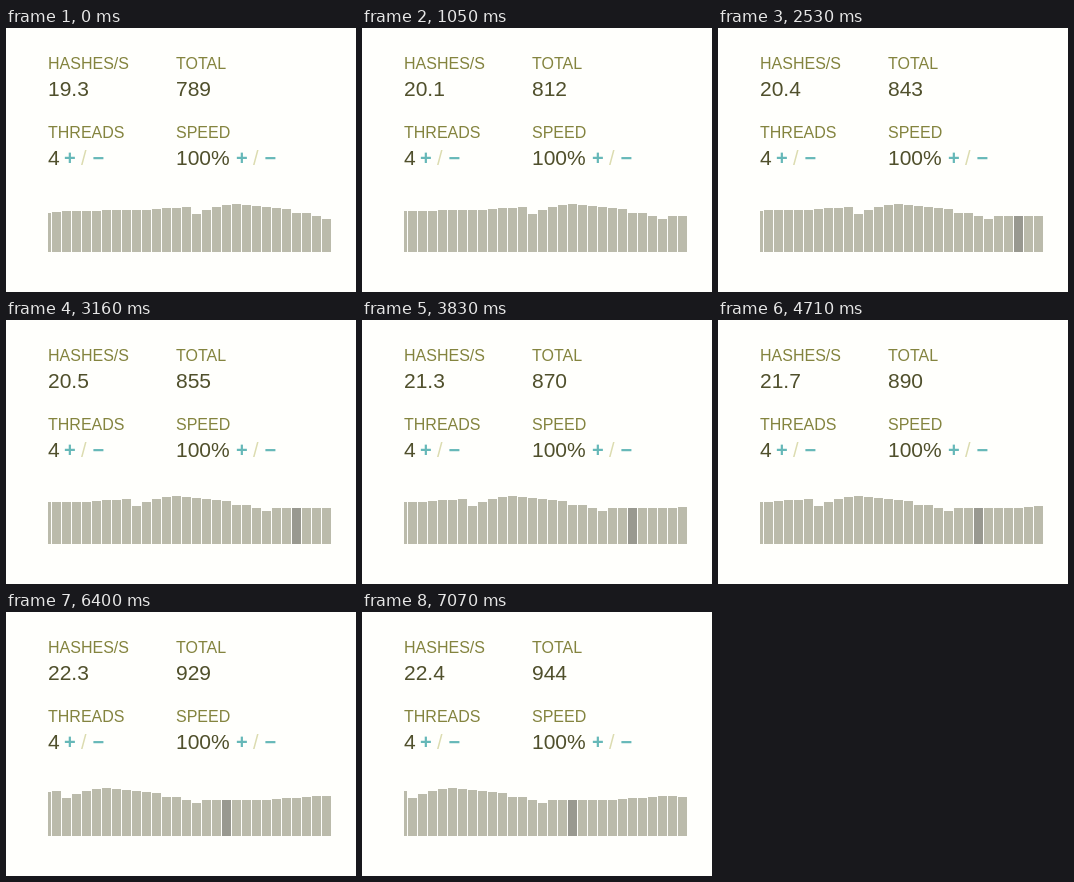
Write an HTML page that moves like this. It is 350 px wide and 264 px high and loops after 7110 ms.

```html
<!DOCTYPE html>
<html lang="en">
<head>
<meta charset="utf-8">
<title>Hash rate</title>
<style>
  html, body { margin: 0; width: 100%; height: 100%; overflow: hidden; background: #fffffc; }
  svg { display: block; font-family: "Liberation Sans", Arial, sans-serif; }
  .label { font-size: 16px; fill: #84843f; }
  .value { font-size: 21px; fill: #50502c; }
  .sign { font-size: 20px; font-weight: bold; fill: #66b8b8; }
  .slash { font-size: 20px; fill: #dcdcb0; }
  #bars { fill: #bbbbab; }
  #bars .accepted { fill: #999990; }
</style>
</head>
<body>
<svg width="350" height="264" viewBox="0 0 350 264">
  <clipPath id="plot"><rect x="42" y="160" width="284" height="64"/></clipPath>
  <text class="label" x="42" y="41">HASHES/S</text>
  <text class="label" x="170" y="41">TOTAL</text>
  <text class="label" x="42" y="110">THREADS</text>
  <text class="label" x="170" y="110">SPEED</text>
  <text class="value" x="42" y="68" id="rate"></text>
  <text class="value" x="170" y="68" id="total"></text>
  <text class="value" x="42" y="137">4</text>
  <text class="value" x="170" y="137">100%</text>
  <g id="controls"></g>
  <g clip-path="url(#plot)"><g id="bars"></g></g>
</svg>
<script>
const LOOP = 7110, STEP = 500, PHASE = 170;
const BASE = 224, PITCH = 10, FIRST_X = 36, BARS = 43, ACCEPTED = 31;

// Key points [position, value], joined by straight lines
const heightKeys = [[0, 39], [2, 41], [10, 42], [14, 45], [15, 38], [17, 45], [19, 48],
  [24, 43], [25, 39], [26, 39], [28, 33], [29, 36], [35, 36], [40, 40], [42, 39]];
const rateKeys = [[0, 19.3], [2, 20.1], [6, 20.5], [9, 21.7], [11, 22.2], [14, 22.4]];
const totalKeys = [[0, 789], [1890, 830], [3160, 855], [LOOP, 945.3]];

const $ = id => document.getElementById(id);

function along(keys, x) {
  const i = keys.findIndex(([end], k) => k > 0 && x <= end);
  const [x0, y0] = keys[i - 1], [x1, y1] = keys[i];
  return y0 + (y1 - y0) * (x - x0) / (x1 - x0);
}

function bar(i) {
  const h = Math.round(along(heightKeys, i));
  const mark = i === ACCEPTED ? ' class="accepted"' : "";
  return `<rect x="${FIRST_X + i * PITCH}" y="${BASE - h}" width="9" height="${h}"${mark}/>`;
}

$("bars").innerHTML = Array.from({ length: BARS }, (_, i) => bar(i)).join("");

$("controls").innerHTML = [58, 230].map(x =>
  `<text class="sign" x="${x}" y="137">+</text>
   <text class="slash" x="${x + 17}" y="137">/</text>
   <text class="sign" x="${x + 28.4}" y="137">−</text>`).join("");

function draw(elapsed) {
  const t = Math.max(0, elapsed) % LOOP;
  const step = Math.floor((t + PHASE) / STEP);
  $("rate").textContent = along(rateKeys, step).toFixed(1);
  $("total").textContent = Math.round(along(totalKeys, t));
  $("bars").setAttribute("transform", `translate(${-step * PITCH})`);
}

const start = performance.now();
function tick(now) {
  draw(now - start);
  requestAnimationFrame(tick);
}
draw(0);
requestAnimationFrame(tick);
</script>
</body>
</html>
```
